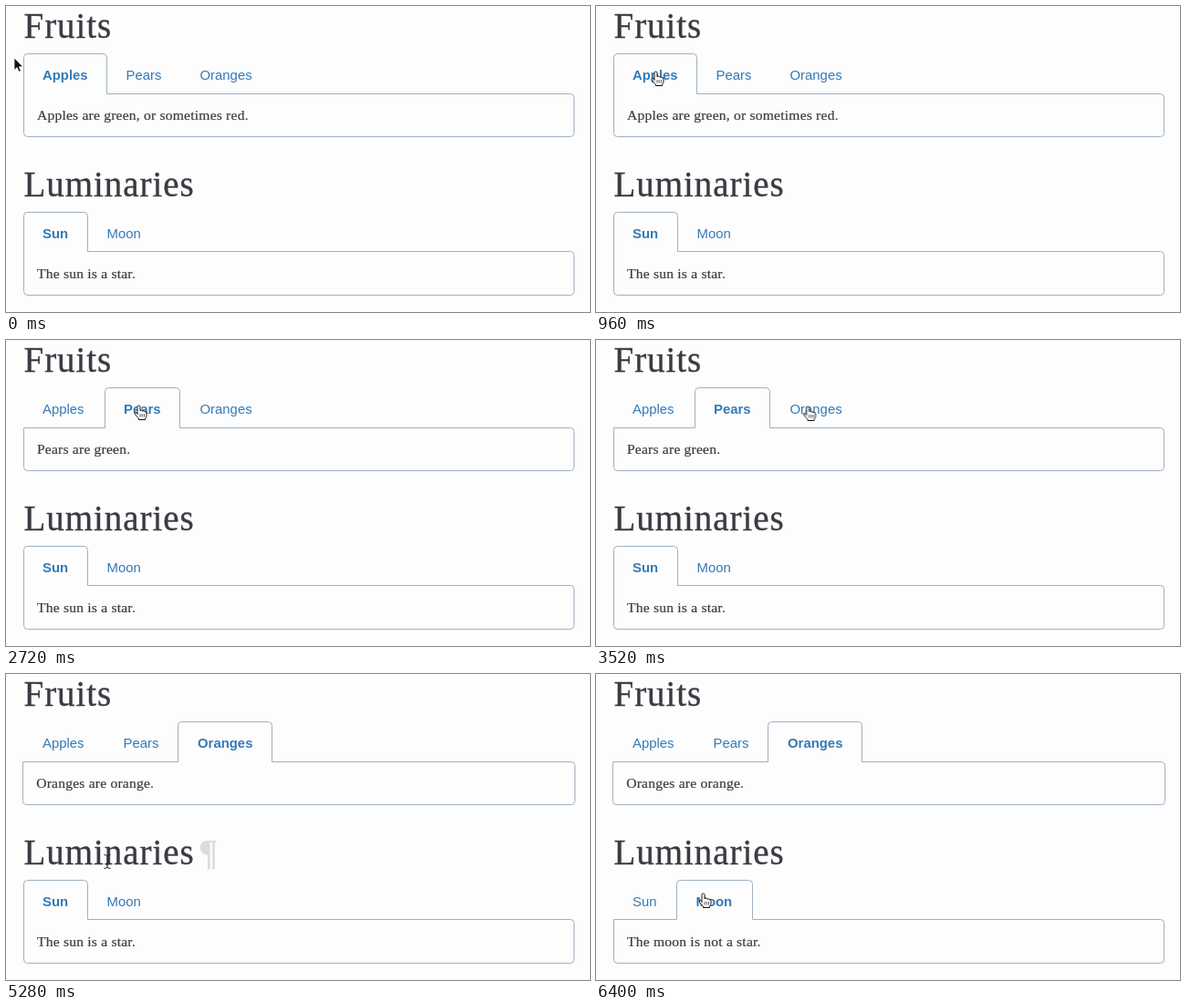
Animation of 640 by 336 pixels, one loop 6480 ms. Source, as an HTML page:

```html
<!DOCTYPE html>
<html lang="en">
<head>
<meta charset="utf-8">
<title>Tabs</title>
<style>
html, body { margin: 0; width: 100%; height: 100%; overflow: hidden; background: #fdfdfd; }
svg { display: block; width: 640px; height: 336px; }
text { fill: #337ab7; font: 14.9px "Liberation Sans", Arial, sans-serif; }
.on { font-weight: bold; }
.h, .p { fill: #393c42; stroke: #393c42; font-family: "Liberation Serif", "Noto Serif", serif; }
.h { font-size: 39px; letter-spacing: .95px; stroke-width: .35px; }
.p { font-size: 15.6px; letter-spacing: .2px; stroke-width: .2px; }
.mark { fill: #dcdcdc; stroke: none; font-weight: bold; }
.box { fill: none; stroke: #9fb1c1; }

.apples, .pears, .oranges, .sun, .moon, .arrow, .hand, .beam {
  animation: 6.48s step-end infinite;
}
.apples { animation-name: apples; }
.pears { animation-name: pears; }
.oranges { animation-name: oranges; }
.sun { animation-name: sun; }
.moon { animation-name: moon; }
.arrow { animation-name: arrow; }
.hand { animation-name: hand; }
.beam { animation-name: beam; }
.cursor { animation: travel 6.48s ease-in-out infinite; }

@keyframes apples { 0% { visibility: visible } 39.5%, 100% { visibility: hidden } }
@keyframes pears { 0%, 59.2%, 100% { visibility: hidden } 39.5% { visibility: visible } }
@keyframes oranges { 0% { visibility: hidden } 59.2%, 100% { visibility: visible } }
@keyframes sun { 0% { visibility: visible } 92.5%, 100% { visibility: hidden } }
@keyframes moon { 0% { visibility: hidden } 92.5%, 100% { visibility: visible } }
@keyframes arrow { 0%, 77.7% { visibility: visible } 6.1%, 80.2%, 100% { visibility: hidden } }
@keyframes hand { 0%, 77.7% { visibility: hidden } 6.1%, 85.1%, 100% { visibility: visible } }
@keyframes beam { 0%, 85.1%, 100% { visibility: hidden } 80.2% { visibility: visible } }
@keyframes travel {
  0%, 2.4% { transform: translate(9px, 57px) }
  13.5%, 23.4% { transform: translate(66px, 72px) }
  33.3%, 34.5% { transform: translate(131px, 73px) }
  38.2%, 45.6% { transform: translate(146px, 72px) }
  55.5%, 75.3% { transform: translate(235px, 73px) }
  81.4%, 82.7% { transform: translate(111px, 206px) }
  87.6%, 100% { transform: translate(118px, 241px) }
}
</style>
</head>
<body>
<svg viewBox="0 0 640 336">
  <text class="h" x="19.5" y="35.3">Fruits</text>
  <g class="apples">
    <path class="box" d="M110.5 96.5H618.5q4 0 4 4V139.5q0 4-4 4H23.5q-4 0-4-4V56.5q0-4 4-4H106.5q4 0 4 4Z"/>
    <text class="on" x="40" y="80.6">Apples</text>
    <text x="131.5" y="80.6">Pears</text>
    <text x="212.5" y="80.6">Oranges</text>
    <text class="p" x="34" y="125">Apples are green, or sometimes red.</text>
  </g>
  <g class="pears">
    <path class="box" d="M190.5 96.5H618.5q4 0 4 4V139.5q0 4-4 4H23.5q-4 0-4-4V96.5H108.5V56.5q0-4 4-4H186.5q4 0 4 4Z"/>
    <text x="40" y="80.6">Apples</text>
    <text class="on" x="129" y="80.6">Pears</text>
    <text x="212.5" y="80.6">Oranges</text>
    <text class="p" x="34" y="125">Pears are green.</text>
  </g>
  <g class="oranges">
    <path class="box" d="M291.5 96.5H619.5q4 0 4 4V139.5q0 4-4 4H22.5q-4 0-4-4V96.5H188.5V56.5q0-4 4-4H287.5q4 0 4 4Z"/>
    <text x="40" y="80.6">Apples</text>
    <text x="128.5" y="80.6">Pears</text>
    <text class="on" x="210" y="80.6">Oranges</text>
    <text class="p" x="33.2" y="125">Oranges are orange.</text>
  </g>

  <text class="h" x="19.5" y="209.3">Luminaries</text>
  <g class="beam"><text class="h mark" x="211" y="209.3">¶</text></g>
  <g class="sun">
    <path class="box" d="M89.5 269.5H618.5q4 0 4 4V313.5q0 4-4 4H23.5q-4 0-4-4V230.5q0-4 4-4H85.5q4 0 4 4Z"/>
    <text class="on" x="40" y="254.8">Sun</text>
    <text x="110.5" y="254.8">Moon</text>
    <text class="p" x="34" y="298.6">The sun is a star.</text>
  </g>
  <g class="moon">
    <path class="box" d="M171.5 269.5H618.5q4 0 4 4V313.5q0 4-4 4H23.5q-4 0-4-4V269.5H88.5V230.5q0-4 4-4H167.5q4 0 4 4Z"/>
    <text x="40" y="254.8">Sun</text>
    <text class="on" x="109.5" y="254.8">Moon</text>
    <text class="p" x="34" y="298.6">The moon is not a star.</text>
  </g>

  <g class="cursor">
    <path class="arrow" d="M0 0V13.5l3.1-2.9 2 4.7 2.3-1-2-4.5H9.6Z" fill="#111" stroke="#fff" stroke-width=".8"/>
    <g class="hand" stroke="#111">
      <path d="M-2 9.5V1.5q0-1.5 1.5-1.5T1 1.5v4q1.6-1 2.6.5 1.6-.8 2.4.6 2-.4 2 1.6v2.5q0 2-1.5 3.5V15.5H-.5V14Q-3 12-5 9q-.3-1.7 1.2-1.6Q-2.8 8-2 9.5Z" fill="#fff"/>
      <path d="M1 9v3.5M3.2 9v3.5M5.4 9v3.5" stroke-width=".7"/>
    </g>
    <path class="beam" d="M-3.5-7.5Q0-7.5 0-5.5V5.5Q0 7.5-3.5 7.5M3.5-7.5Q0-7.5 0-5.5M0 5.5Q0 7.5 3.5 7.5M-2 3H2" fill="none" stroke="#222"/>
  </g>
</svg>
</body>
</html>
```
